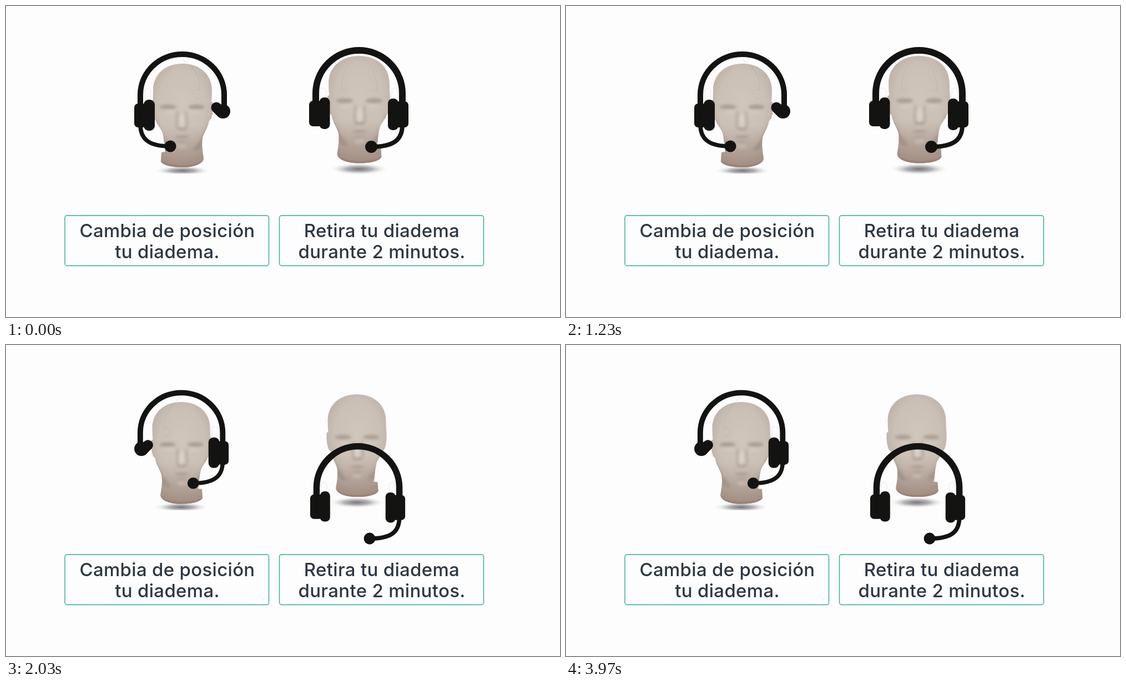
These frames come from a looping animation (998x561 px, 4010 ms). An HTML page:

```html
<!DOCTYPE html>
<html lang="es">
<head>
<meta charset="utf-8">
<title>Pausa de diadema</title>
<style>
html, body { margin: 0; width: 100%; height: 100%; overflow: hidden; background: #fdfdfd; }
svg { display: block; width: 100%; height: 100%; }
text { font: 500 33px Inter, "Open Sans", sans-serif; letter-spacing: .3px; text-anchor: middle; fill: #2d3743; }
.box { fill: none; stroke: #2aae96; stroke-width: 1.4; }
.gear { fill: #131311; stroke: none; }
.wire { fill: none; stroke: #131311; stroke-linecap: round; }
.hair { fill: none; stroke: #9a92a0; stroke-width: .6; opacity: .4; }
</style>
</head>
<body>
<svg viewBox="0 0 998 561">
  <defs>
    <radialGradient id="skin" gradientUnits="userSpaceOnUse" cx="317" cy="178" r="112" gradientTransform="translate(317 0) scale(.68 1) translate(-317 0)">
      <stop offset="0" stop-color="#d0c6bc"/>
      <stop offset=".55" stop-color="#cbc0b6"/>
      <stop offset=".85" stop-color="#bbafa5"/>
      <stop offset="1" stop-color="#ab9d93"/>
    </radialGradient>
    <linearGradient id="low" gradientUnits="userSpaceOnUse" x1="0" y1="215" x2="0" y2="291">
      <stop offset="0" stop-color="#a08a7e" stop-opacity="0"/>
      <stop offset="1" stop-color="#a08a7e" stop-opacity=".75"/>
    </linearGradient>
    <radialGradient id="shade">
      <stop offset="0" stop-color="#77777b"/>
      <stop offset=".45" stop-color="#b5b5b8"/>
      <stop offset="1" stop-color="#fdfdfd" stop-opacity="0"/>
    </radialGradient>
    <filter id="soft" x="-50%" y="-50%" width="200%" height="200%"><feGaussianBlur stdDeviation="2.6"/></filter>
    <path id="skull" d="M318 104C350 104 371 124 371 152Q371 164 370 173C374 171 374 182 372 194Q370 206 366 207C364 219 357 228 354 238C352 250 354 262 356 274C356 284 340 291 318 291C298 291 282 287 279 280L280 264L287 263C285 250 285 240 282 229C278 219 272 214 270 207C266 204 263 190 264 174Q265 164 265 152C265 124 286 104 318 104Z"/>
    <clipPath id="face"><use href="#skull"/></clipPath>
    <clipPath id="cut"><path d="M267 280H371V302.500H267Z"/></clipPath>

    <g id="head">
      <use href="#skull" fill="url(#skin)"/>
      <use href="#skull" fill="url(#low)"/>
      <g clip-path="url(#face)">
        <path d="M278 278Q290 287 318 287Q350 287 357 273V295H278Z" fill="#9b8376"/>
        <g filter="url(#soft)" fill="#8d7d72">
          <ellipse cx="292" cy="182" rx="15" ry="4" opacity=".55"/>
          <ellipse cx="343" cy="182" rx="15" ry="4" opacity=".55"/>
          <path d="M272 205Q276 232 300 258L284 260L266 210Z" opacity=".4"/>
          <path d="M368 200Q360 232 336 260Q346 264 358 250Z" opacity=".45"/>
          <path d="M307 190L305 216L309 220L311 190ZM326 190L328 216L324 220L322 190Z" opacity=".35"/>
          <ellipse cx="317" cy="221" rx="10" ry="2.500" opacity=".55"/>
          <ellipse cx="317" cy="236" rx="13" ry="2" opacity=".55"/>
          <ellipse cx="317" cy="245" rx="9" ry="2" opacity=".35"/>
          <ellipse cx="317" cy="207" rx="4" ry="13" fill="#e2d9cf" opacity=".7"/>
          <ellipse cx="317" cy="253" rx="9" ry="4" fill="#d5c8bd" opacity=".5"/>
          <ellipse cx="294" cy="192" rx="9" ry="3" fill="#d9cfc5" opacity=".55"/>
          <ellipse cx="341" cy="192" rx="9" ry="3" fill="#d9cfc5" opacity=".55"/>
        </g>
      </g>
    </g>
  </defs>

  <g id="left">
    <ellipse cx="318" cy="297" rx="52" ry="9" fill="url(#shade)" clip-path="url(#cut)"/>
    <use href="#head"/>
    <path class="hair" d="M318 97C336 105 349 125 349 152A8 8 0 1 0 349 166M250 168V156Q251 148 257 149Q262 150 261 168"/>
    <path class="wire" stroke-width="10" d="M242 182V160A75.500 73 0 0 1 393 160V182"/>
    <path class="wire" stroke-width="7.500" d="M242 214C242 242 260 253 296 253"/>
    <path class="wire" stroke-width="19" d="M379 183L388 192"/>
    <g class="gear">
      <rect x="231" y="176" width="22" height="43" rx="7"/>
      <rect x="248" y="169" width="20" height="56" rx="9"/>
      <circle cx="296" cy="253" r="10.500"/>
      <circle cx="391" cy="190" r="13"/>
    </g>
  </g>

  <g id="bust">
    <ellipse cx="636" cy="294" rx="54" ry="11" fill="url(#shade)"/>
    <use href="#head" transform="translate(965.100 -17.600) scale(-1.035 1.035)"/>
  </g>
  <path id="seam" class="hair" d="M637 92C612 104 604 125 604 154M637 92C660 104 668 125 668 154M604 154Q612 146 616 154M668 154Q660 146 655 154"/>
  <g id="headset">
    <path class="hair" d="M566 168V156Q566 148 572 148Q578 149 577 165M695 168V156Q695 148 701 148Q707 149 707 168"/>
    <path class="wire" stroke-width="12" d="M558 178V158A78 78 0 0 1 714 158V178"/>
    <path class="wire" stroke-width="8" d="M714 214C714 242 698 254 658 254"/>
    <g class="gear">
      <rect x="546" y="171" width="24" height="46" rx="7"/>
      <rect x="564.500" y="165" width="19" height="57" rx="8.500"/>
      <rect x="688" y="167" width="19" height="57" rx="8.500"/>
      <rect x="700" y="172" width="25" height="47" rx="7"/>
      <circle cx="658" cy="254" r="11"/>
    </g>
  </g>

  <rect class="box" x="106" y="378" width="367.500" height="90.500" rx="4"/>
  <rect class="box" x="492.500" y="378" width="368" height="90.500" rx="4"/>
  <text x="290.500" y="416.500">Cambia de posición</text>
  <text x="290.500" y="455">tu diadema.</text>
  <text x="677" y="416.500">Retira tu diadema</text>
  <text x="677" y="455">durante 2 minutos.</text>
</svg>
<script>
const LOOP = 4010, SWITCH = 2000;
const moved = {
  left: 'translate(628.2 .6) scale(-.983 .983)',
  bust: 'translate(24 3) scale(.956)',
  headset: 'translate(26 106.3) scale(.956)'
};
const part = id => document.getElementById(id);
const start = performance.now();

function draw() {
  const after = (performance.now() - start) % LOOP >= SWITCH;
  for (const id in moved) part(id).setAttribute('transform', after ? moved[id] : '');
  part('seam').style.display = after ? 'none' : '';
  requestAnimationFrame(draw);
}
draw();
</script>
</body>
</html>
```
